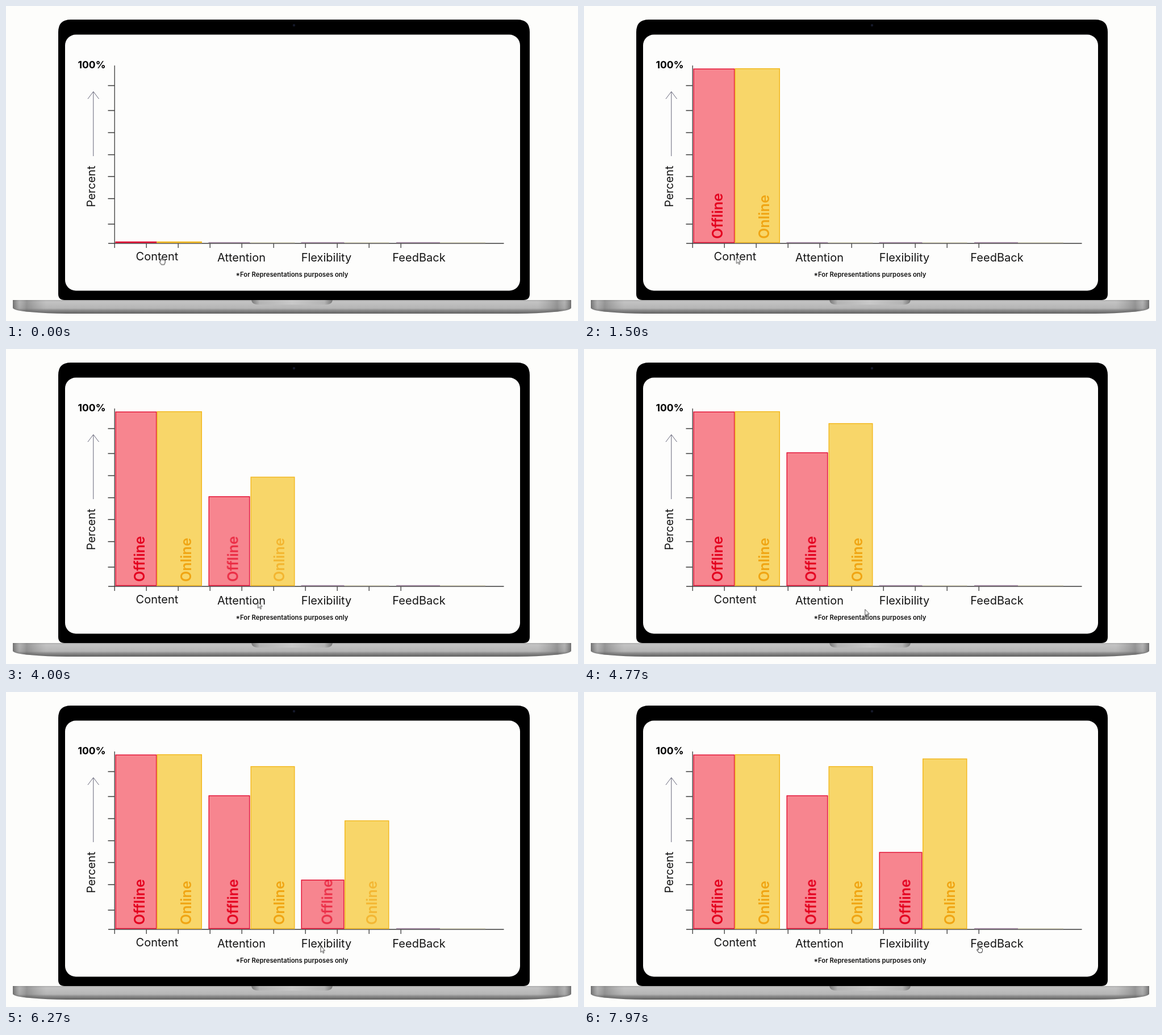
These frames come from a looping animation (1007 px wide and 556 px high, 8000 ms). An HTML page:

```html
<!DOCTYPE html>
<html lang="en">
<head>
<meta charset="utf-8">
<title>Offline and online chart</title>
<style>
html, body { margin: 0; width: 100%; height: 100%; overflow: hidden; background: #fdfdfb; }
svg { display: block; width: 1007px; height: 556px; font-family: Inter, "Open Sans", sans-serif; }
.axis { fill: none; stroke: #3a3a3a; stroke-width: 1.3; }
.name { font-size: 20px; fill: #151515; }
.tag { font-size: 25px; font-weight: 600; }
.hand { fill: #fff; stroke: #222; stroke-width: 1; stroke-linejoin: round; }
</style>
</head>
<body>
<svg viewBox="0 0 1007 556">
  <defs>
    <linearGradient id="metal" x2="0" y2="1">
      <stop offset="0" stop-color="#a9a9a9"/>
      <stop offset=".12" stop-color="#c3c3c3"/>
      <stop offset=".6" stop-color="#b5b5b5"/>
      <stop offset=".75" stop-color="#8c8c8c"/>
      <stop offset="1" stop-color="#606060"/>
    </linearGradient>
    <linearGradient id="ends">
      <stop offset="0" stop-color="#444" stop-opacity=".65"/>
      <stop offset=".012" stop-color="#777" stop-opacity=".2"/>
      <stop offset=".025" stop-color="#555" stop-opacity=".4"/>
      <stop offset=".06" stop-color="#777" stop-opacity="0"/>
      <stop offset=".94" stop-color="#777" stop-opacity="0"/>
      <stop offset=".975" stop-color="#555" stop-opacity=".4"/>
      <stop offset=".988" stop-color="#777" stop-opacity=".2"/>
      <stop offset="1" stop-color="#444" stop-opacity=".65"/>
    </linearGradient>
    <linearGradient id="notch">
      <stop offset="0" stop-color="#777"/>
      <stop offset=".1" stop-color="#b4b4b4"/>
      <stop offset=".5" stop-color="#c8c8c8"/>
      <stop offset=".9" stop-color="#b4b4b4"/>
      <stop offset="1" stop-color="#777"/>
    </linearGradient>
    <path id="base" d="M12 519H995V533Q992 538 965 540Q935 543 900 543H107Q72 543 42 540Q15 538 12 533Z"/>
  </defs>

  <path d="M92 46Q92 24 114 24H900Q922 24 922 46V508Q922 519 911 519H103Q92 519 92 508Z"/>
  <circle cx="507" cy="34" r="2.2" fill="#15192a"/>
  <rect x="104" y="50.5" width="801" height="452" rx="19" fill="#fdfdfc"/>
  <use href="#base" fill="url(#metal)"/>
  <use href="#base" fill="url(#ends)"/>
  <path d="M432 519H575Q574 527 563 527H444Q433 527 432 519Z" fill="url(#notch)"/>

  <path id="axes" class="axis"/>
  <path d="M153.8 265V151.5M144 164L153.8 151L163.5 164" fill="none" stroke="#55556a" stroke-width=".9"/>
  <text x="126.5" y="110" font-size="17.5" font-weight="700">100%</text>
  <text class="name" transform="translate(156.5 355) rotate(-90)">Percent</text>
  <g class="name" text-anchor="middle">
    <text x="266" y="448.5">Content</text>
    <text x="414.5" y="450.5">Attention</text>
    <text x="564" y="450.5">Flexibility</text>
    <text x="727" y="450.5">FeedBack</text>
  </g>
  <text x="503.5" y="478" font-size="11.3" font-weight="600" text-anchor="middle" fill="#111">*For Representations purposes only</text>

  <g id="bars"></g>

  <g id="cursor">
    <path id="arrow" d="M0 0V11L2.6 8.7L4.4 12.5L6 11.8L4.3 8H7.6Z" fill="#fff" stroke="#333" stroke-width=".9"/>
    <path id="point" class="hand" d="M4.2 1Q5.7 -.2 6.2 1.5V5Q7.6 4.2 8.2 5.4Q9.6 4.8 10 6Q11.6 5.7 11.5 7.5V9.5L10.2 13H5L2 9Q1.2 7.2 2.6 7.3L4.2 8.6Z"/>
    <path id="press" class="hand" d="M3.5 3.2Q4.8 1.6 6 3Q7.3 2 8.3 3.3Q9.7 2.6 10.3 4Q11.8 3.8 11.7 5.7V9L10.2 13H5L2.2 9Q1.3 7.3 3.5 7.2ZM6 3.2V5.5M8.3 3.5V5.5M10.2 4.2V5.8"/>
  </g>
</svg>
<script>
const LOOP = 8000, GROW = 900, FLOOR = 417.5;
const $ = id => document.getElementById(id);
const PINK = { fill: '#f7858f', line: '#e2082c', text: '#e4001f', idle: '#a386a2' };
const GOLD = { fill: '#f8d669', line: '#f2b619', text: '#f0a513', idle: '#dfdbc4' };

function add(tag, attrs, text = '') {
  const el = document.createElementNS('http://www.w3.org/2000/svg', tag);
  for (const k in attrs) el.setAttribute(k, attrs[k]);
  el.textContent = text;
  return $('bars').appendChild(el);
}

// rows: [time, properties, easing to the next row]
function play(el, rows) {
  const frames = rows.map(([t, props, easing = 'linear']) => ({ ...props, offset: t / LOOP, easing }));
  frames.push({ ...rows[rows.length - 1][1], offset: 1 });
  const anim = el.animate(frames, { duration: LOOP, iterations: Infinity });
  anim.startTime = document.timeline.currentTime;
}

function tween(el, start, from, to, length = GROW) {
  const rows = [[start, from, 'ease'], [start + length, to]];
  if (start) rows.unshift([0, from]);
  play(el, rows);
}

function bar(color, x, w, top, start, label, base) {
  add('rect', { x, y: 416.8, width: w, height: 1.5, fill: color.idle });
  if (start === undefined) return;
  const rect = add('rect', { x: x + .7, y: FLOOR - 1, width: w - 1.4, height: 1,
    fill: color.fill, stroke: color.line, 'stroke-width': 1.4 });
  tween(rect, start, { y: FLOOR - 1 + 'px', height: '1px' },
    { y: top + .6 + 'px', height: FLOOR - top - .6 + 'px' });
  play(rect, start ? [[0, { opacity: 0 }, 'step-end'], [start, { opacity: 1 }]] : [[0, { opacity: 1 }]]);
  const text = add('text', { class: 'tag', fill: color.text,
    transform: `translate(${base} 411) rotate(-90)` }, label);
  tween(text, start, { opacity: 0 }, { opacity: 1 });
}

const ticksY = [140.5, 184.5, 223.5, 262.5, 301, 340, 385];
let axes = 'M191.2 105V427M180 419H876.5';
for (const y of ticksY) axes += `M179.5 ${y}H191`;
for (let i = 1; i < 10; i++) axes += `M${191.2 + i * 56} 419V427`;
$('axes').setAttribute('d', axes);

const groups = [
  [0, [192.5, 73, 110.5, 244], [265.5, 79.5, 110, 326]],
  [3650, [356.5, 73, 182.5, 408.5], [430.5, 78, 131, 490]],
  [5940, [519.5, 76, 282.5, 574.5], [596, 78.5, 117.5, 653]],
  [undefined, [687, 77, 0, 0], [764, 80, 0, 0]]
];
for (const [start, [ax, aw, at, ab], [bx, bw, bt, bb]] of groups) {
  bar(PINK, ax, aw, at, start, 'Offline', ab);
  bar(GOLD, bx, bw, bt, start, 'Online', bb);
}

const at = (x, y) => ({ transform: `translate(${x}px, ${y}px)` });
play($('cursor'), [
  [0, at(268.5, 443.5)],
  [1750, at(268.5, 443.5), 'ease-in'],
  [2100, at(350, 456), 'ease-out'],
  [2550, at(443.5, 446.5)],
  [4520, at(443.5, 446.5), 'ease-in'],
  [4770, at(494.5, 459.5), 'ease-out'],
  [5250, at(554, 448.5)],
  [6950, at(554, 448.5), 'ease-in'],
  [7250, at(620, 458), 'ease-out'],
  [7700, at(690, 447)]
]);

const looks = [[0, 'press'], [100, 'arrow'], [2420, 'point'], [3560, 'press'], [3660, 'arrow'],
  [5080, 'point'], [5850, 'press'], [5950, 'arrow'], [7560, 'point']];
for (const id of ['arrow', 'point', 'press'])
  play($(id), looks.map(([t, look]) => [t, { opacity: look === id ? 1 : 0 }, 'step-end']));
</script>
</body>
</html>
```
